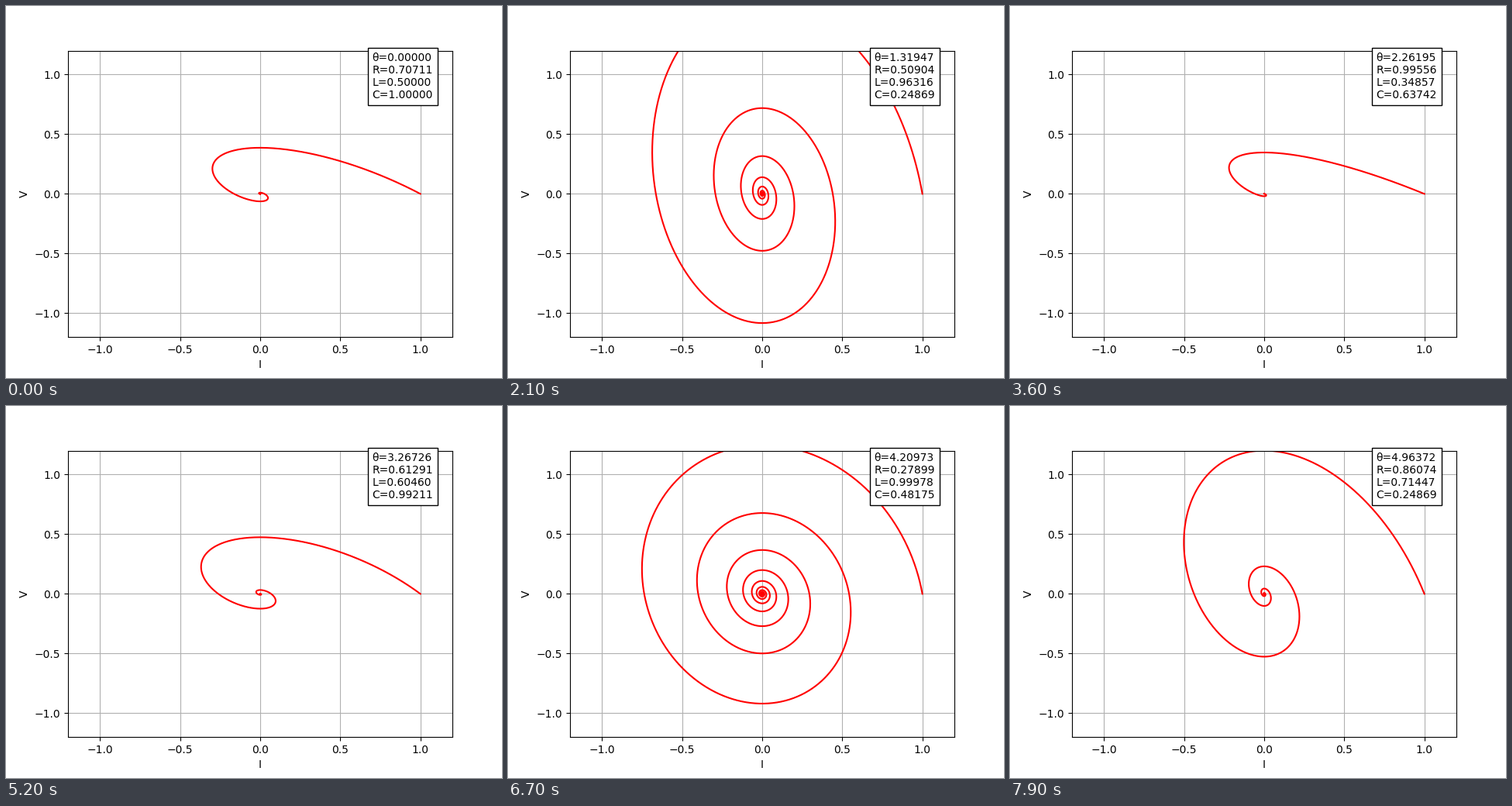
A matplotlib script for the animation above (8 s loop, 640x480 px).

```python
import numpy as np
import matplotlib.pyplot as plt
from matplotlib.animation import FuncAnimation

FRAMES = 80
STEPS_PER_TURN = 100
t = np.linspace(0, 100, 20000)


def components(i):
    """Angle and R, L, C values for one step."""
    theta = 2 * np.pi * (i / STEPS_PER_TURN)
    r = abs(np.cos(theta + np.pi / 4))
    l = abs(np.sin(theta + np.pi / 6))
    c = abs(np.cos(theta))
    return theta, r, l, c


def discharge(r, l, c):
    """Current and voltage of a series RLC circuit with I(0)=1, V(0)=0."""
    a = r / (2 * l)
    s = np.sqrt(complex(a * a - 1 / (l * c)))
    p, q = -a + s, -a - s
    ep, eq = np.exp(p * t), np.exp(q * t)
    current = (p * ep - q * eq) / (2 * s)
    voltage = (ep - eq) / (2 * s * c)
    return current.real, voltage.real


fig, ax = plt.subplots(figsize=(6.4, 4.8), dpi=100)
ax.set(xlim=(-1.2, 1.2), ylim=(-1.2, 1.2), xlabel="I", ylabel="V")
ax.grid(True)
curve, = ax.plot([], [], color="red")
label = ax.text(0.7, 0.8, "", bbox=dict(facecolor="white", edgecolor="black"))


def update(i):
    theta, r, l, c = components(i)
    curve.set_data(*discharge(r, l, c))
    label.set_text(f"θ={theta:.5f}\nR={r:.5f}\nL={l:.5f}\nC={c:.5f}")
    return curve, label


anim = FuncAnimation(fig, update, frames=FRAMES, interval=100, repeat=True)
plt.show()
```
